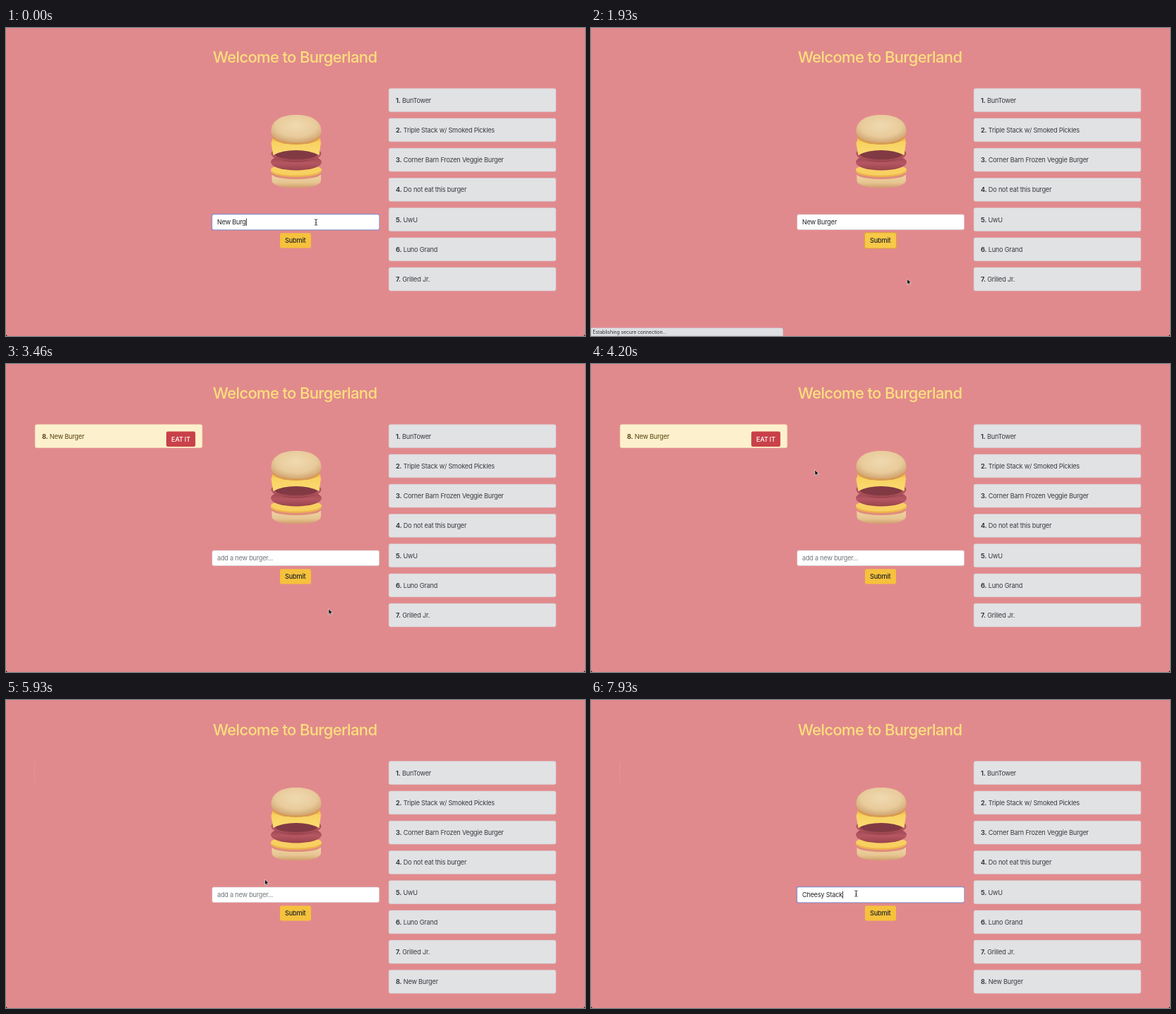
An HTML page for the animation above (8000 ms loop, 820x436 px).

```html
<!DOCTYPE html>
<html lang="en">
<head>
<meta charset="utf-8">
<title>Burgerland</title>
<style>
  html, body { margin: 0; width: 100%; height: 100%; overflow: hidden; background: #000; }
  svg { display: block; width: 820px; height: 436px; }
  text { font: 400 9.2px Inter, "Liberation Sans", sans-serif; letter-spacing: -.025em; white-space: pre; fill: #383c40; }
  .bold { font-weight: 700; }
  .title { font-size: 22px; font-weight: 500; letter-spacing: -.03em; fill: #fcdf7d; }
  .button { font-weight: 500; text-anchor: middle; }
  .status { font-size: 7px; letter-spacing: -.02em; fill: #333; }
</style>
</head>
<body>
<svg viewBox="0 0 820 436">
  <defs>
    <radialGradient id="bun" cx=".5" cy=".38" r=".62">
      <stop offset="0" stop-color="#f0d9b0"/><stop offset=".65" stop-color="#e8cb9b"/><stop offset="1" stop-color="#d2a672"/>
    </radialGradient>
    <linearGradient id="heel" x2="0" y2="1">
      <stop offset="0" stop-color="#efd3a2"/><stop offset=".6" stop-color="#e6c592"/><stop offset="1" stop-color="#cfa06c"/>
    </linearGradient>
    <linearGradient id="patty" x2="0" y2="1">
      <stop offset="0" stop-color="#8f404a"/><stop offset=".55" stop-color="#b65762"/><stop offset="1" stop-color="#98434c"/>
    </linearGradient>
    <linearGradient id="cheese" x2="0" y2="1">
      <stop offset="0" stop-color="#eeb24a"/><stop offset=".3" stop-color="#f8d261"/><stop offset="1" stop-color="#fbdc72"/>
    </linearGradient>
  </defs>
  <path fill="#e18a8d" d="M0 0H820V433Q820 436 817 436H3Q0 436 0 433Z"/>

  <g id="page">
    <text class="title" x="293" y="48.6">Welcome to Burgerland</text>

    <g id="burger">
      <path fill="url(#heel)" d="M376.5 208H446V216Q445 226 411 226Q377 226 376.5 216Z"/>
      <ellipse cx="411" cy="207" rx="34.5" ry="7" fill="#e08d7c"/>
      <ellipse cx="411" cy="202.5" rx="36" ry="8.5" fill="#eeb54b"/>
      <ellipse cx="411" cy="200.5" rx="36" ry="8" fill="#f8d062"/>
      <ellipse cx="411" cy="190" rx="36" ry="11.5" fill="url(#patty)"/>
      <ellipse cx="411" cy="178" rx="35.5" ry="12" fill="url(#patty)"/>
      <ellipse cx="411" cy="179" rx="30" ry="7" fill="#813a43"/>
      <path fill="url(#cheese)" d="M378 155H444.5L446 162L443.5 180Q430 173 411 173Q391 173 378.5 180L375.5 163Z"/>
      <ellipse cx="411" cy="153.5" rx="33.5" ry="11.5" fill="#d99a50"/>
      <path fill="url(#bun)" d="M375.5 146C375.5 131 390 123 411 123S446.5 131 446.5 146C446.5 157 430 162.5 411 162.5S375.5 157 375.5 146Z"/>
    </g>

    <rect id="inputRing" x="290.8" y="262.8" width="238.4" height="23.8" rx="3.2" fill="#9583b4"/>
    <rect id="input" x="292" y="264" width="236.5" height="21.5" rx="2.3" fill="#fff" stroke-width=".6"/>
    <text id="entry" x="299" y="277.9"></text>
    <rect id="caret" y="269.5" width=".8" height="10.5" fill="#111"/>

    <rect id="submitRing" x="386.8" y="289" width="46.4" height="23.6" rx="3" fill="#dda23f"/>
    <rect id="submit" x="388" y="290.2" width="44" height="21.2" rx="2.3"/>
    <text class="button" x="409.8" y="304.2" style="fill:#212529">Submit</text>

    <g id="cards"></g>

    <g id="fresh">
      <rect x="41.3" y="85.8" width="236.5" height="32.8" rx="2.3" fill="#fdf1cd" stroke="#fbe9b8" stroke-width=".6"/>
      <text x="51" y="105.7" style="fill:#574410"><tspan class="bold">8.</tspan> New Burger</text>
      <rect id="eatRing" x="225.6" y="94.2" width="44" height="24" rx="3" fill="#eba394"/>
      <rect id="eat" x="227" y="95.5" width="41.2" height="21.5" rx="2.3"/>
      <text class="button" x="247.5" y="109.6" style="fill:#fff">EAT IT</text>
    </g>
  </g>

  <g id="status">
    <path d="M0 424.5H269Q272 424.5 272 427.5V436H0Z" fill="#dee0e3" stroke="#c3b3b6" stroke-width=".5"/>
    <text class="status" x="2.5" y="432.8">Establishing secure connection...</text>
  </g>

  <g id="cursor">
    <path id="arrow" d="M0 0V8L1.9 6.3L3.1 9L4.4 8.4L3.2 5.8H5.7Z" fill="#111" stroke="#fff" stroke-width=".6"/>
    <path id="beam" d="M-2 -4.2Q0 -4.2 0 -3V3Q0 4.2 -2 4.2M2 -4.2Q0 -4.2 0 -3M2 4.2Q0 4.2 0 3M-1 .8H1" fill="none" stroke="#222" stroke-width=".9"/>
    <path id="hand" d="M-.8 .5Q0 -.8 .8 .5V3.4L4 4.2Q4.8 4.5 4.6 5.6L4 9.4H-.7L-3 6Q-3.2 4.6 -1.8 5L-.8 6Z" fill="#fff" stroke="#222" stroke-width=".7" stroke-linejoin="round"/>
  </g>
</svg>

<script>
const LOOP = 8000;
const SUBMITTED = 1150, RELOADED = 2350, PRESSED = 5080, EATEN = 5480, FOCUSED = 6060;
const menu = ["BunTower", "Triple Stack w/ Smoked Pickles", "Corner Barn Frozen Veggie Burger",
  "Do not eat this burger", "UwU", "Luno Grand", "Grilled Jr.", "New Burger"];
const secondEntry = "Cheesy Stack";

// time, x, y
const path = [
  [0, 439, 275], [500, 439, 275], [900, 412, 302], [1250, 412, 302],
  [1800, 447.7, 355], [2000, 447.7, 355], [2600, 475.7, 373], [3300, 475.7, 373],
  [4050, 317, 149.7], [4250, 317, 149.7], [4800, 238.5, 102.5], [5500, 238.5, 102.5],
  [6050, 384, 274.5], [6700, 384, 274.5], [7200, 375.5, 274], [LOOP, 375.5, 274]
];

const $ = id => document.getElementById(id);
const show = (id, on) => $(id).setAttribute("visibility", on ? "inherit" : "hidden");
const paint = (id, name, value) => $(id).setAttribute(name, value);

$("cards").innerHTML = menu.map((name, i) => {
  const y = 85.8 + i * 42.22;
  return `<g id="card${i + 1}">
    <rect x="542.2" y="${y}" width="236.5" height="32.8" rx="2.3" fill="#e1e2e4" stroke="#d5d4d7" stroke-width=".6"/>
    <text x="552" y="${y + 19.9}"><tspan class="bold">${i + 1}.</tspan> ${name}</text></g>`;
}).join("");

function cursorAt(t) {
  const i = path.findIndex(step => step[0] > t);
  const [t0, x0, y0] = path[i - 1], [t1, x1, y1] = path[i];
  const p = (t - t0) / (t1 - t0), e = p * p * (3 - 2 * p);
  return [x0 + (x1 - x0) * e, y0 + (y1 - y0) * e];
}

function entryAt(t) {
  if (t < RELOADED) return "New Burger".slice(0, t < 130 ? 8 : t < 270 ? 9 : 10);
  const first = Math.min(6, Math.floor((t - 6150) / 75));
  const rest = Math.max(0, Math.floor((t - 6610) / 150));
  return secondEntry.slice(0, Math.max(0, first + rest));
}

function over(id, x, y) {
  const { x: left, y: top, width, height } = $(id).getBBox();
  return x > left && x < left + width && y > top && y < top + height;
}

function draw(t) {
  const [x, y] = cursorAt(t);
  const fresh = t >= RELOADED && t < EATEN;
  const focused = t < SUBMITTED || t >= FOCUSED;
  const onInput = over("input", x, y);
  const onSubmit = over("submit", x, y);
  const onEat = fresh && over("eat", x, y);
  const submitFocus = t >= SUBMITTED && t < RELOADED;
  const pressed = t >= PRESSED && fresh;

  paint("page", "transform", `translate(0 ${t >= EATEN ? 1 : 0})`);
  show("card8", t >= EATEN);
  show("fresh", fresh);
  show("eatRing", pressed);
  paint("eat", "fill", pressed ? "#a93137" : onEat ? "#b9363f" : "#c94149");

  const entry = entryAt(t);
  $("entry").textContent = entry || "add a new burger...";
  $("entry").style.fill = entry ? "#23272b" : "#72777c";
  show("inputRing", focused);
  paint("input", "stroke", focused ? "#93aee0" : "#d3d0d5");
  show("caret", focused);
  paint("caret", "x", 299.2 + (entry ? $("entry").getComputedTextLength() : 0));

  show("submitRing", submitFocus);
  paint("submit", "fill", onSubmit ? "#dfab2e" : submitFocus ? "#f8c848" : "#f6c13c");
  show("status", t >= 1700 && t < RELOADED);

  paint("cursor", "transform", `translate(${x} ${y})`);
  show("beam", onInput);
  show("hand", onSubmit || onEat);
  show("arrow", !onInput && !onSubmit && !onEat);
}

const start = performance.now();
function tick() {
  draw((performance.now() - start) % LOOP);
  requestAnimationFrame(tick);
}
tick();
</script>
</body>
</html>
```
